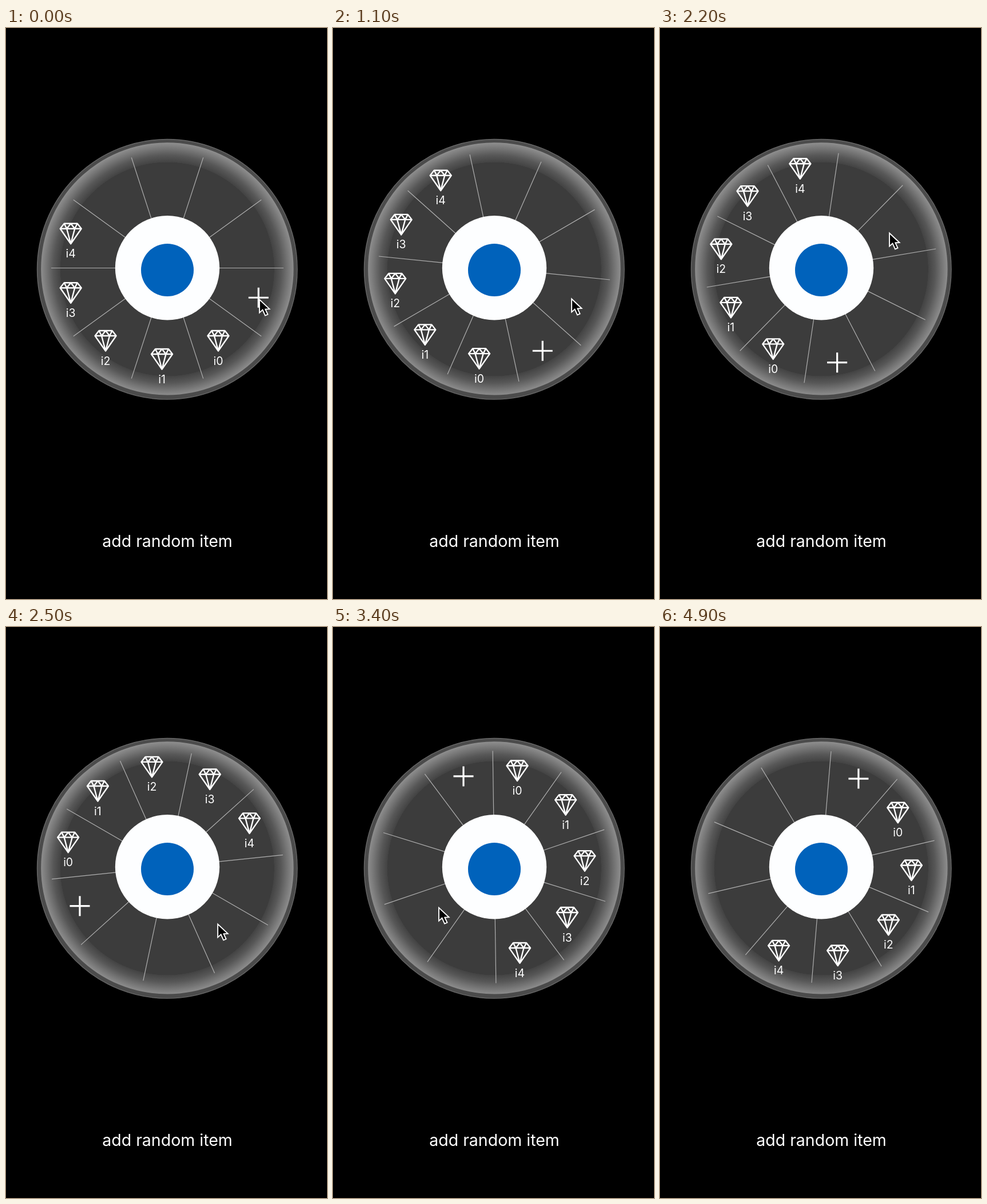
Animation, 561 px wide and 998 px high, one loop 5 s. Source, as an HTML page:

```html
<!DOCTYPE html>
<html>
<head>
<meta charset="utf-8">
<style>
html, body { margin: 0; width: 100%; height: 100%; overflow: hidden; background: #000; }
svg { display: block; width: 561px; height: 998px; }
text { font-family: Inter, Roboto, sans-serif; fill: #fff; text-anchor: middle; }
</style>
</head>
<body>
<svg viewBox="0 0 561 998">
  <defs>
    <radialGradient id="rim" gradientUnits="userSpaceOnUse" cx="281.8" cy="421.5" r="221">
      <stop offset=".845" stop-color="#3c3c3c"/>
      <stop offset=".846" stop-color="#434343"/>
      <stop offset=".9" stop-color="#575757"/>
      <stop offset=".95" stop-color="#737373"/>
      <stop offset="1" stop-color="#8e8e8e"/>
    </radialGradient>
    <path id="gem" fill="none" stroke="#fff" stroke-width="2.4" stroke-linejoin="round"
      d="M-11.5-17H11.5L18.5-8L0 18.5L-18.5-8ZM-18.5-8H18.5M-11.5-17L-7-8L0-17L7-8L11.5-17M-7-8L0 18.5L7-8"/>
  </defs>
  <circle cx="281.8" cy="421.8" r="227.3" fill="#4b4b4b" stroke="#666" stroke-width="1.4"/>
  <circle cx="281.9" cy="420.9" r="220.7" fill="url(#rim)"/>
  <path id="spokes" stroke="#b0b0b0" stroke-width="1.2"/>
  <circle cx="282" cy="419.3" r="91.2" fill="#fdfeff"/>
  <circle cx="282" cy="423" r="46" fill="#0062bb"/>
  <path id="plus" d="M-17.5 0H17.5M0-17.5V17.5" stroke="#fff" stroke-width="3.2"/>
  <g id="items"></g>
  <text x="282" y="907" font-size="28.5">add random item</text>
  <path id="cursor" fill="#000" stroke="#fff" stroke-width="1.9"
    d="M1 2.5V25.5L6.5 20.5L11 30.5L15.5 28.5L11.3 19.5L18.5 19Z"/>
</svg>
<script>
const CX = 282, CY = 419.5, LOOP = 5000, STEP = 100, HIDE = 4000;
const $ = id => document.getElementById(id);

// time, wheel angle, pointer angle, pointer radius
const keys = [
  [0, 18, 18.2, 168.4],
  [600, 18, -20.8, 175],
  [1100, 59.8, 21, 143.6],
  [1200, 62, 23.2, 138],
  [1800, 62, -46.5, 150],
  [2200, 80.5, -28.3, 134],
  [2300, 98, -10.5, 134],
  [2600, 185, 77.5, 129],
  [2900, 229.3, 123, 121],
  [3400, 251.2, 145, 119.6],
  [3800, 290.9, 185.8, 114.6],
  [3900, 292.8, 188, 114],
  [LOOP, 292.8, 188, 114]
];

function pose(t) {
  const i = keys.findIndex(k => k[0] > t);
  const a = keys[i - 1], b = keys[i];
  const p = (t - a[0]) / (b[0] - a[0]);
  return a.map((v, j) => v + (b[j] - v) * p);
}

function polar(deg, r) {
  const a = deg * Math.PI / 180;
  return [CX + r * Math.cos(a), CY + r * Math.sin(a)];
}

const place = (el, [x, y]) => el.setAttribute("transform", `translate(${x} ${y})`);

$("items").innerHTML = [0, 1, 2, 3, 4].map(n =>
  `<g><use href="#gem" x="-9.5" y="-9"/><text x="-9.5" y="33.5" font-size="19.5">i${n}</text></g>`).join("");
const items = [...$("items").children];

function draw(t) {
  const [, wheel, angle, radius] = pose(t);
  let d = "";
  for (let k = 0; k < 10; k++) {
    const a = wheel + 18 + 36 * k;
    d += `M${polar(a, 90)}L${polar(a, 203)}`;
  }
  $("spokes").setAttribute("d", d);
  place($("plus"), polar(wheel, 167.5));
  items.forEach((el, n) => place(el, polar(wheel + 36 * (n + 1), 167.5)));
  place($("cursor"), polar(angle, radius));
  $("cursor").setAttribute("visibility", t < HIDE ? "visible" : "hidden");
}

const start = performance.now();
function tick() {
  const t = (performance.now() - start) % LOOP;
  draw(Math.floor(t / STEP) * STEP);
  requestAnimationFrame(tick);
}
tick();
</script>
</body>
</html>
```
